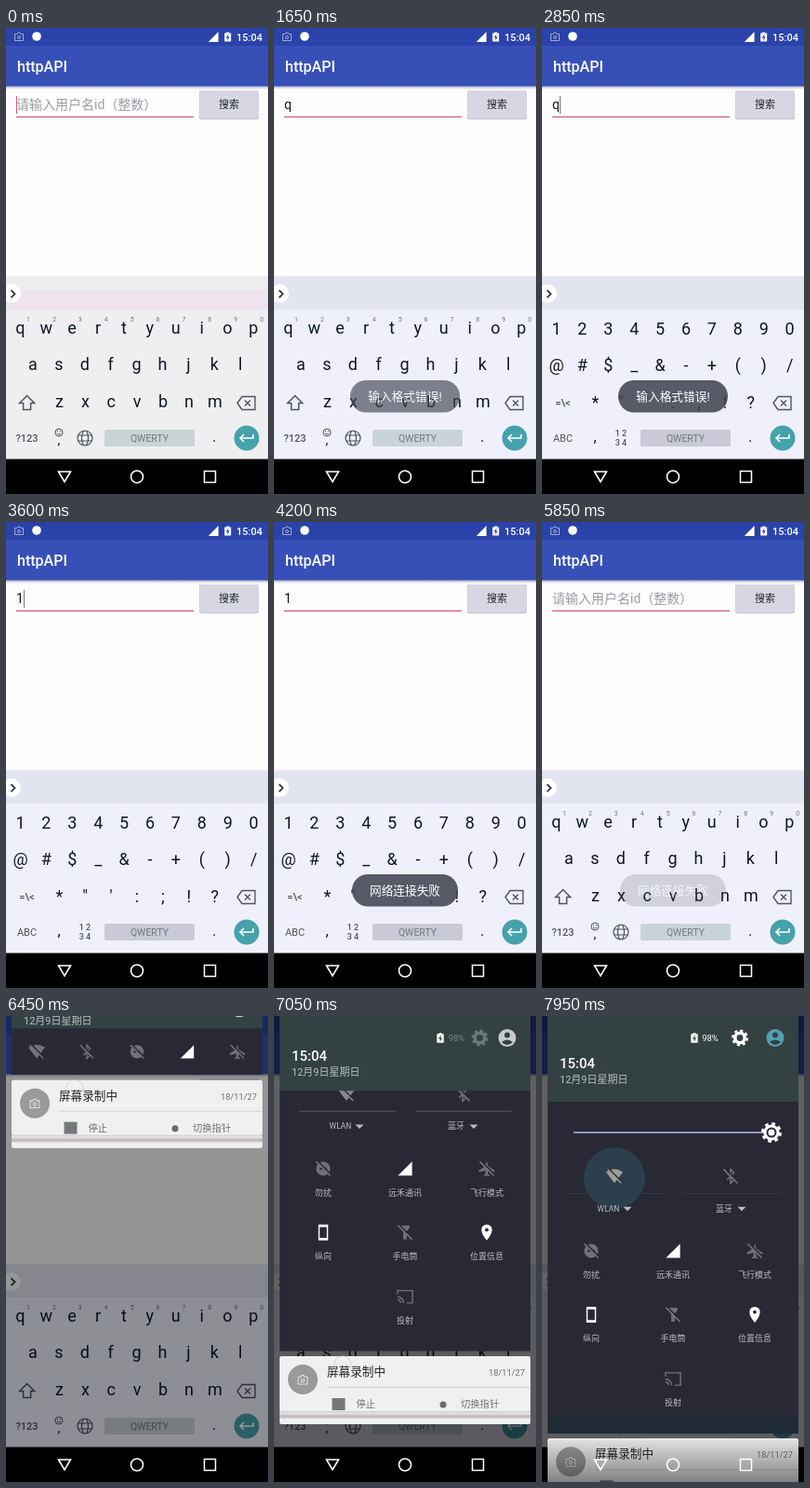
Animation of 282 by 500 pixels, one loop 8 s. Source, as an HTML page with a canvas:

```html
<!DOCTYPE html>
<html lang="zh-CN">
<head>
<meta charset="utf-8">
<style>
html, body { margin: 0; width: 100%; height: 100%; overflow: hidden; background: #000; }
canvas { display: block; width: 282px; height: 500px; }
</style>
</head>
<body>
<canvas id="stage"></canvas>
<script>
const ratio = window.devicePixelRatio || 1;

function prepare(canvas) {
  canvas.width = 282 * ratio;
  canvas.height = 500 * ratio;
  const context = canvas.getContext('2d');
  context.scale(ratio, ratio);
  return context;
}

const stage = prepare(document.getElementById('stage'));
const layer = prepare(document.createElement('canvas'));
let ctx = stage;

const FONT = 'Roboto, "Noto Sans CJK SC", "Noto Sans CJK", sans-serif';
const LOOP = 8000, STEP = 150;
const INK = '#0e1825', GRAY = '#4d555f', PINK = '#d05a82';
const PANEL = '#282935', HEADER = '#344142';

const clamp = v => Math.min(1, Math.max(0, v));
const ramp = (t, from, to) => clamp((t - from) / (to - from));
const within = (t, from, to) => t >= from && t < to;

function box(x, y, w, h, color, r = 0) {
  ctx.fillStyle = color;
  ctx.beginPath();
  ctx.roundRect(x, y, w, h, r);
  ctx.fill();
}

function disc(x, y, r, color) {
  ctx.fillStyle = color;
  ctx.beginPath();
  ctx.arc(x, y, r, 0, 7);
  ctx.fill();
}

function text(s, x, y, size, color, align = 'center', weight = 400) {
  ctx.font = `${weight} ${size}px ${FONT}`;
  ctx.fillStyle = color;
  ctx.textAlign = align;
  ctx.textBaseline = 'middle';
  ctx.fillText(s, x, y);
}

function shape(path, x, y, color, line = 0, scale = 1) {
  ctx.save();
  ctx.translate(x, y);
  ctx.scale(scale, scale);
  const p = new Path2D(path);
  if (line) {
    ctx.lineWidth = line;
    ctx.strokeStyle = color;
    ctx.stroke(p);
  } else {
    ctx.fillStyle = color;
    ctx.fill(p, 'evenodd');
  }
  ctx.restore();
}

// Draws a group on its own layer, then blends it as a whole.
function faded(alpha, draw) {
  if (alpha <= 0) return;
  layer.setTransform(ratio, 0, 0, ratio, 0, 0);
  layer.clearRect(0, 0, 282, 500);
  layer.setTransform(stage.getTransform());
  ctx = layer;
  draw();
  ctx = stage;
  ctx.save();
  ctx.setTransform(ratio, 0, 0, ratio, 0, 0);
  ctx.globalAlpha = clamp(alpha);
  ctx.drawImage(layer.canvas, 0, 0, 282, 500);
  ctx.restore();
}

// path, stroke width (0 = filled)
const ICONS = {
  wifi: ['M-10-5Q0-12 10-5L0 8Z', 0],
  bluetooth: ['M-4-4L4 4L0 8V-8L4-4L-4 4', 1.6],
  quiet: ['M-8 0A8 8 0 1 1 8 0A8 8 0 1 1-8 0ZM-4-1V1H4V-1Z', 0],
  signal: ['M-8 8L8-8V8Z', 0],
  plane: ['M0-9L1.5-3L9 2V4L1.5 2V6L3.5 8V9L0 8L-3.5 9V8L-1.5 6V2L-9 4V2L-1.5-3Z', 0],
  phone: ['M-5.5-9H5.5V9H-5.5ZM-4-6V6H4V-6Z', 0],
  torch: ['M-5-8H5V-5L2-1V8H-2V-1L-5-5Z', 0],
  pin: ['M0 9C-3 5-6 1-6-3A6 6 0 1 1 6-3C6 1 3 5 0 9ZM-2-3A2 2 0 1 0 2-3A2 2 0 1 0-2-3Z', 0],
  cast: ['M-8.5-3V-7H8.5V7H2M-8.5 0A7 7 0 0 1-1.5 7M-8.5 3.5A3.5 3.5 0 0 1-5 7', 1.5],
  camera: ['M-4.5-3H-2L-1-4.5H1L2-3H4.5V4H-4.5ZM-1.5 .5A1.5 1.5 0 1 0 1.5 .5A1.5 1.5 0 1 0-1.5 .5Z', 1],
  battery: ['M-3.5-4H-1.5V-5H1.5V-4H3.5V5H-3.5ZM.8-3L-2 1H-.3V4L2 0H.3Z', 0]
};

function icon(name, x, y, color, scale = 1, off = false) {
  const [path, line] = ICONS[name];
  shape(path, x, y, color, line, scale);
  if (!off) return;
  shape('M-7-9L9 7', x, y, PANEL, 2, scale);
  shape('M-8-8L8 8', x, y, color, 1.6, scale);
}

function cog(x, y, r, color) {
  ctx.save();
  ctx.strokeStyle = color;
  ctx.lineWidth = r * .4;
  ctx.beginPath();
  ctx.arc(x, y, r * .58, 0, 2 * Math.PI);
  ctx.stroke();
  ctx.beginPath();
  ctx.setLineDash([r * .8 * Math.PI / 8, r * .8 * Math.PI / 8]);
  ctx.arc(x, y, r * .8, 0, 2 * Math.PI);
  ctx.stroke();
  ctx.restore();
}

function drawApp(t) {
  box(0, 0, 282, 500, '#fdfdfd');
  const shadow = ctx.createLinearGradient(0, 62, 0, 66);
  shadow.addColorStop(0, '#a9abc4');
  shadow.addColorStop(1, '#fdfdfd');
  box(0, 62, 282, 4, shadow);
  box(0, 0, 282, 19, '#2a42aa');
  box(0, 19, 282, 43.5, '#3650b8');
  icon('camera', 14, 9.5, '#a3abc6');
  disc(33, 9, 4.8, '#fff');
  icon('signal', 223.2, 9.5, '#fff', .68);
  icon('battery', 238.7, 9.5, '#fff');
  text('15:04', 276, 10.5, 11, '#fff', 'right', 500);
  text('httpAPI', 12, 42.3, 16, '#fff', 'left', 500);

  const value = within(t, 1050, 3150) ? 'q' : within(t, 3450, 5400) ? '1' : '';
  if (value) text(value, 11, 82.5, 14, INK, 'left');
  else text('请输入用户名id（整数）', 11, 82.8, 14, '#9c9ca8', 'left');
  box(11, 94.7, 191, 1.3, PINK);
  const blinks = [[0, 300], [750, 1500], [1950, 2250], [2850, 3900], [4500, 5700]];
  if (blinks.some(([a, b]) => within(t, a, b)))
    box(11 + (value ? 8 : 0), 73, 1, 19, value ? '#777a86' : PINK);

  const pressed = within(t, 1200, 1500) || within(t, 3750, 4050);
  box(208, 67, 64, 31.3, '#c6c6d1', 2);
  box(208.5, 67, 63, 30, pressed ? '#c6c6d4' : '#d7d7e3', 2);
  text('搜索', 240, 82.8, 11, '#20242c', 'center', 500);
}

const columns = (keys, x, y, size = 18) =>
  [...keys].forEach((key, i) => text(key, x + 27.9 * i, y, size, INK));

function drawKeyboard(t) {
  const symbols = within(t, 2400, 5550);
  const first = t < 300;
  box(0, 266, 282, 1, '#eeeef2');
  box(0, 267, 282, 35, first ? '#eeeeef' : '#e2e4f0');
  if (first) box(0, 281, 282, 21, '#efe3ee');
  box(0, 302, 282, 161, first ? '#efeff2' : '#f0f0fc');
  disc(6, 285, 10, '#fff');
  shape('M-2-4L2 0L-2 4', 7.5, 285.3, '#2b2f36', 1.7);

  if (symbols) {
    columns('1234567890', 15.5, 323.5);
    columns('@#$_&-+()/', 15.5, 363);
    text('=\\<', 22.5, 402.5, 11, GRAY, 'center', 500);
    columns('*"\':;!?', 57.3, 402.7);
    text('ABC', 22.5, 440.5, 11, GRAY);
    text(',', 57, 439, 16, INK);
    text('1 2', 85, 435, 9, GRAY, 'center', 500);
    text('3 4', 85, 445, 9, GRAY, 'center', 500);
  } else {
    columns('qwertyuiop', 15.3, 322.5);
    [...'1234567890'].forEach((n, i) => text(n, 24 + 27.9 * i, 313, 7, '#70767f'));
    columns('asdfghjkl', 29, 362);
    columns('zxcvbnm', 57.5, 401.8);
    shape('M0-8L8 0H4V7H-4V0H-8Z', 22.6, 402.5, GRAY, 1.5);
    text('?123', 22.5, 440.5, 11, GRAY, 'center', 500);
    shape('M-4 0A4 4 0 1 1 4 0A4 4 0 1 1-4 0M-2 1Q0 3.2 2 1M-1.5-2V-.8M1.5-2V-.8', 57, 434, GRAY, 1);
    text(',', 57, 443, 14, INK);
    shape('M-8 0A8 8 0 1 1 8 0A8 8 0 1 1-8 0ZM-3.5 0A3.5 8 0 1 1 3.5 0A3.5 8 0 1 1-3.5 0ZM-7-3H7M-7 3H7', 85, 440, GRAY, 1.2);
  }
  shape('M-10 0L-5-7H9V7H-5ZM-2-3L4 3M4-3L-2 3', 259, 402.5, GRAY, 1.4);
  box(106, 431, 97, 18, symbols ? '#c9c9d7' : '#c9d4d8', 2);
  text('QWERTY', 154.5, 440.5, 10.5, '#737981');
  text('.', 224, 439, 16, INK);
  disc(259, 440, 13.5, '#45a2ab');
  shape('M7-4V0H-7M-3-4L-7 0L-3 4', 259, 440, '#fff', 1.6);
}

function drawToast(message, width, alpha) {
  faded(alpha, () => {
    box(141 - width / 2, 378, width, 34.5, 'rgba(66,69,82,.88)', 17);
    text(message, 141, 396, 12.7, '#fff');
  });
}

const TILES = [
  [53, 252, 'quiet', '勿扰', false],
  [141, 252, 'signal', '远禾通讯', true],
  [229, 252, 'plane', '飞行模式', false],
  [53, 320.5, 'phone', '纵向', true],
  [141, 320.5, 'torch', '手电筒', false],
  [229, 320.5, 'pin', '位置信息', true],
  [141, 389.5, 'cast', '投射', null]
];
const OFF = '#70717b', LABEL = '#bbbcc3';

function drawTiles(t) {
  box(34, 124, 214, 2, '#9096c4');
  cog(247, 125, 11, '#fff');
  disc(247, 125, 7.5, '#fff');
  disc(247, 125, 5.5, PANEL);
  disc(247, 125, 3.5, '#fff');

  const ripple = ramp(t, 7500, 7950);
  if (ripple) disc(78, 174, 33 * ripple, '#2c3f4c');
  icon('wifi', 78, 172, ripple ? '#a09f98' : '#888990', .9, true);
  icon('bluetooth', 203, 172, OFF, .95, true);
  const divider = t < 7350 ? '#53545d' : '#353743';
  box(27, 190, 104, 1, divider);
  box(152, 190, 104, 1, divider);
  text('WLAN', 71.5, 207, 8.5, LABEL);
  text('蓝牙', 196, 207, 9, LABEL);
  for (const x of [92, 215]) shape('M-4.5-2H4.5L0 2.5Z', x, 206.8, LABEL);

  for (const [x, y, name, label, on] of TILES) {
    icon(name, x, y, on ? '#fff' : OFF, .95, on === false);
    text(label, x, y + 26.3, 9, LABEL);
  }
}

function drawHeader(t, open) {
  const height = 45 + 47 * open, drop = 31.4 * open, away = 1 - open;
  box(6, 0, 270, height, HEADER);
  text('15:04', 19, 19.8 + drop, 15, '#fff', 'left', 500);
  text('12月9日星期日', 19, 37.4 + drop, 11, '#b9c0c0', 'left');
  icon('battery', 164 + 60 * away, 23.5, '#fff', 1.05);
  faded(.1 + .9 * ramp(open, .65, 1), () =>
    text('98%', 181 + 62 * away, 24, 9.5, '#fff'));
  faded(ramp(open, .65, 1), () => cog(213 + 34 * away, 23.5, 9, '#fff'));
  disc(251, 23.5, 9.5, t < 7350 ? '#c6caca' : '#559fb3');
  disc(251, 20.5, 3, HEADER);
  shape('M-6 0Q0-5 6 0Q0 6-6 0Z', 251, 28, HEADER);
}

function drawNotification(y) {
  const stack = ctx.createLinearGradient(0, y + 58, 0, y + 73);
  stack.addColorStop(0, '#b9b5b9');
  stack.addColorStop(.2, '#ebe5ea');
  stack.addColorStop(.45, '#b9b5b9');
  stack.addColorStop(.65, '#f0eef0');
  stack.addColorStop(1, '#f2f2f2');
  box(6, y + 50, 270, 23, stack, 2);
  box(6, y, 270, 59, '#f0f0f1', 2);
  disc(31, y + 25, 16, '#999a9b');
  icon('camera', 31, y + 25.5, '#dedede', 1.1);
  text('屏幕录制中', 57, y + 17.2, 12.6, '#202124', 'left');
  text('18/11/27', 270, y + 18.3, 9.3, '#6f7073', 'right');
  box(57, y + 33, 219, 1, '#d2d2d5');
  box(62.5, y + 45, 14, 13, '#76777a');
  text('停止', 88.5, y + 52.3, 10.3, '#707174', 'left');
  disc(182, y + 52, 3.5, '#68696c');
  text('切换指针', 201, y + 52.3, 10.3, '#707174', 'left');
}

function drawShade(t) {
  const pull = ramp(t, 6150, 6600), open = ramp(t, 6600, 7200);
  if (!pull) return;
  const bottom = 95 + 353 * open;
  box(0, 0, 282, 463, `rgba(0,0,0,${.62 * pull})`);
  ctx.save();
  ctx.translate(0, (pull - 1) * 95);
  drawNotification(bottom + 5.3);
  ctx.save();
  ctx.beginPath();
  ctx.rect(6, 0, 270, bottom);
  ctx.clip();
  box(6, 0, 270, bottom, PANEL);
  ctx.translate(0, bottom - 448);
  faded(open * 1.5, () => drawTiles(t));
  if (t >= 7350) box(6, 430, 270, 18, '#1e2b37');
  ctx.restore();
  drawHeader(t, open);
  faded(1 - open * 3, () =>
    ['wifi', 'bluetooth', 'quiet', 'signal', 'plane'].forEach((name, i) =>
      icon(name, 33 + 54 * i, 70, name === 'signal' ? '#fff' : OFF, .9, name !== 'signal')));
  ctx.restore();

  if (bottom > 440) {
    const dim = ctx.createLinearGradient(0, 455, 0, 500);
    dim.addColorStop(0, 'rgba(20,20,24,.08)');
    dim.addColorStop(1, 'rgba(20,20,24,.5)');
    box(6, 455, 270, 45, dim);
  }
  if (t < 7200) {
    ctx.strokeStyle = 'rgba(190,190,195,.6)';
    ctx.lineWidth = 1;
    ctx.beginPath();
    ctx.arc(74, (pull - 1) * 95 + bottom + 14, 9, 0, 7);
    ctx.stroke();
  }
}

function drawNavigation() {
  shape('M-6.5-5.5H6.5L0 5.5Z', 63, 481.5, '#fff', 1.6);
  shape('M-6.5 0A6.5 6.5 0 1 1 6.5 0A6.5 6.5 0 1 1-6.5 0Z', 141, 481.5, '#fff', 1.6);
  shape('M-6-6H6V6H-6Z', 219.5, 481.5, '#fff', 1.5);
}

function render() {
  const t = Math.floor(performance.now() % LOOP / STEP) * STEP;
  drawApp(t);
  drawKeyboard(t);
  drawToast('输入格式错误!', 118, ramp(t, 1350, 1750) * (1 - ramp(t, 3300, 3600)));
  drawToast('网络连接失败', 114, ramp(t, 3900, 4200) * (1 - ramp(t, 5500, 5940)));
  box(0, 462.5, 282, 38, '#000');
  drawShade(t);
  drawNavigation();
  requestAnimationFrame(render);
}
render();
</script>
</body>
</html>
```
